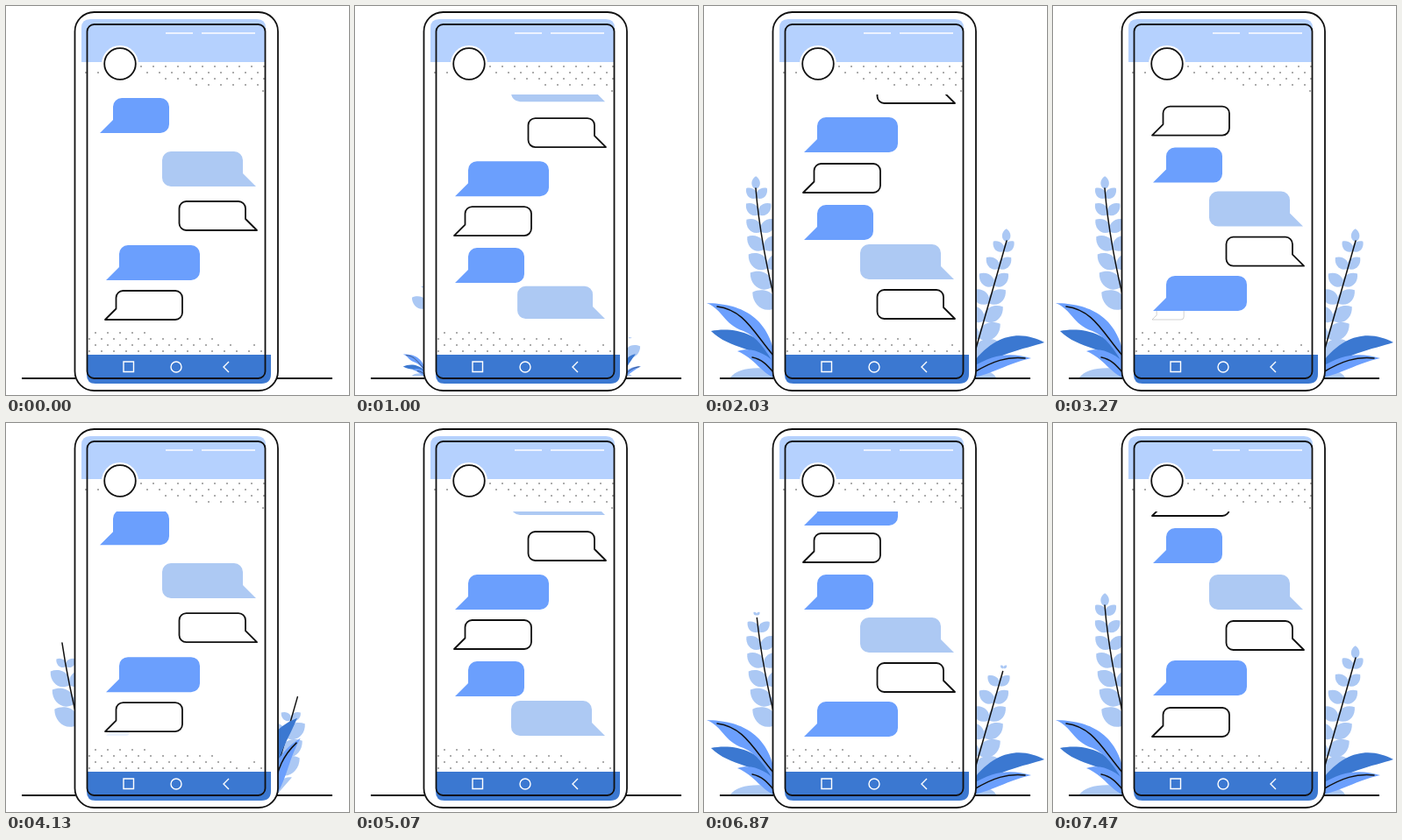
An HTML page for the animation above (7530 ms loop, 391 px wide and 444 px high).

```html
<!DOCTYPE html>
<html lang="en">
<head>
<meta charset="utf-8">
<title>Chat on a phone</title>
<style>
html, body { margin: 0; width: 100%; height: 100%; overflow: hidden; background: #fff; }
svg { display: block; width: 391px; height: 444px; }
.line { fill: none; stroke: #111; stroke-width: 1.8; stroke-linejoin: round; }
.rib { fill: none; stroke: #111; stroke-width: 1.5; stroke-linecap: round; }
.dots { fill: none; stroke: #333; stroke-width: 1.5; stroke-linecap: round; stroke-dasharray: 0 14; }
.icon { fill: none; stroke: #fff; stroke-width: 1.4; }
.light { fill: #abc8f4; }
.mid { fill: #6b9ffd; }
.dark { fill: #3b78d1; }
</style>
</head>
<body>
<svg viewBox="0 0 391 444">
  <clipPath id="view"><rect x="80" y="101" width="228" height="297"/></clipPath>
  <g id="plants">
    <g id="stems"></g>
    <g data-side="left" data-turn="0"><path class="light" d="M30 424C38 414 55 411 82 415V424Z"/></g>
    <g data-side="left" data-turn="-13"><path class="dark" d="M8 371C30 367 60 370 82 402V414C62 388 30 393 8 371Z"/></g>
    <g data-side="left" data-turn="-3">
      <path class="mid" d="M82 405C74 352 40 340 3 339C22 347 22 363 45 371C60 377 70 392 82 412Z"/>
      <path class="rib" d="M15 343C46 347 56 372 80 400"/>
    </g>
    <g data-side="left" data-turn="-8">
      <path class="mid" d="M38 394C55 388 72 398 82 408V425C66 420 58 402 38 394Z"/>
      <path class="rib" d="M55 401C66 403 72 410 80 419"/>
    </g>
    <g data-side="right" data-turn="0"><path class="light" d="M333 424C328 416 318 415 306 416V424Z"/></g>
    <g data-side="right" data-turn="-40"><path class="dark" d="M388 384C365 372 335 370 306 408V422C330 396 365 392 388 384Z"/></g>
    <g data-side="right" data-turn="-14">
      <path class="mid" d="M373 402C350 395 330 397 306 412V424C330 420 345 408 373 402Z"/>
      <path class="rib" d="M366 402C345 400 330 405 308 418"/>
    </g>
  </g>
  <path class="line" d="M18 425H79M309 425H372"/>
  <rect x="78.5" y="7" width="231.500" height="432" rx="22" fill="#fff"/>
  <path fill="#b5d1fe" d="M86 64V25Q86 15 96 15H286Q296 15 296 25V64Z"/>
  <path class="dark" d="M92 398H302V420Q302 431 291 431H102Q92 431 92 421Z"/>
  <path class="dots" d="M154 69H295M91 76H106M147 76H289M182 83H295M217 90H289M293 97H294"/>
  <path class="dots" d="M102 373H160M95 380H236M102 387H257M283 387H284M95 394H299"/>
  <g id="chat" clip-path="url(#view)"></g>
  <rect class="line" x="92.500" y="21" width="203" height="404" rx="8"/>
  <rect class="line" x="78.500" y="7" width="231.500" height="432" rx="22"/>
  <path class="icon" d="M182 31H213M223 31H284"/>
  <circle cx="130" cy="66" r="21" fill="#fff"/>
  <circle class="line" cx="130" cy="66" r="17.800"/>
  <path class="icon" d="M134 406H145.500V417.500H134ZM254 406L248 412L254 418"/>
  <circle class="icon" cx="194" cy="412" r="6"/>
</svg>
<script>
const LOOP = 7530;
const clamp = v => Math.max(0, Math.min(1, v));
const lerp = (a, b, p) => a + (b - a) * p;
const ease = p => (1 - Math.cos(Math.PI * clamp(p))) / 2;
const $ = id => document.getElementById(id);

function add(parent, attrs) {
  const node = document.createElementNS('http://www.w3.org/2000/svg', 'path');
  set(node, attrs);
  return parent.appendChild(node);
}
function set(node, attrs) {
  for (const key in attrs) node.setAttribute(key, attrs[key]);
}

// Bubble outline with its top at y = 0; side is -1 for a left tail, 1 for a right tail.
function bubble(left, right, height, tail, radius, side, paint) {
  const near = side < 0 ? left : right, far = side < 0 ? right : left;
  const r = radius * side, tip = near + tail * side, sweep = side < 0 ? 1 : 0;
  const arc = (x, y) => `A${radius} ${radius} 0 0 ${sweep} ${x} ${y}`;
  const d = `M${tip} ${height}L${near} ${height - tail}V${radius}${arc(near - r, 0)}H${far + r}` +
    `${arc(far, radius)}V${height - radius}${arc(far + r, height)}Z`;
  return { d, tip, height, ...paint };
}
const fill = color => ({ fill: color, stroke: 'none', inset: 0 });
const outline = { fill: '#fff', stroke: '#111', inset: 1 };
const KINDS = [
  bubble(129, 193, 40, 15, 10, -1, fill('#6b9ffd')),
  bubble(178, 270, 40, 15, 10, 1, fill('#adc9f3')),
  bubble(197.5, 273, 33, 13, 8, 1, outline),
  bubble(129, 221, 40, 15, 10, -1, fill('#6b9ffd')),
  bubble(125.500, 201, 33, 12.500, 8, -1, outline)
];

// Bubble tops, newest first; `moved` is the row that sits 7px further left.
const small = { newest: 0, tops: [317, 270, 220, 169, 112, 52], moved: 5 };
const pale = { newest: 1, tops: [317, 272, 224, 173, 123, 65] };
const reply = { newest: 2, tops: [323, 272, 227, 179, 127, 77] };
const wide = { newest: 3, tops: [318, 273, 222, 173, 125, 77] };
const answer = { newest: 4, tops: [324, 271, 225, 173, 120, 72] };
const spread = { newest: 4, tops: [324, 273, 222, 166, 105, 50], moved: 4 };
const EVENTS = [
  [-1000, 200, spread], [50, 210, small], [783, 270, pale], [1620, 210, reply],
  [2445, 215, wide], [3205, 215, answer], [3560, 480, spread], [4090, 190, small],
  [4795, 270, pale], [5645, 215, reply], [6475, 215, wide], [7250, 215, answer]
];
const rows = small.tops.map(() => add($('chat'), { 'stroke-width': 1.8, 'stroke-linejoin': 'round' }));

function drawChat(t) {
  const index = EVENTS.findLastIndex(e => e[0] <= t);
  const [start, length, now] = EVENTS[index];
  const before = EVENTS[Math.max(0, index - 1)][2];
  const p = ease((t - start) / length);
  const step = before.newest === now.newest ? 0 : 1;
  const slide = (state, i) => state.moved === i ? -7 : 0;
  rows.forEach((row, i) => {
    const kind = KINDS[(now.newest - i + 10) % 5];
    const pops = step && i === 0;
    const from = pops ? 0 : i - step;
    const y = (pops ? now.tops[0] : lerp(before.tops[from], now.tops[i], p)) + kind.inset;
    const x = pops ? 0 : lerp(slide(before, from), slide(now, i), p);
    const size = pops ? lerp(0.25, 1, p) : 1;
    set(row, {
      d: kind.d, fill: kind.fill, stroke: kind.stroke,
      opacity: pops ? clamp(p * 1.2) : 1,
      transform: `translate(${x + kind.tip * (1 - size)} ${y + kind.height * (1 - size)}) scale(${size})`
    });
  });
}

const LEAF = 'M0 0C.45 -.2 .4 -.75 0 -1C-.4 -.75 -.45 -.2 0 0Z';
function makeStem(base, bend, top) {
  const at = u => [0, 1].map(k => lerp(lerp(base[k], bend[k], u), lerp(bend[k], top[k], u), u));
  const leaves = [];
  const leaf = (u, angle, length) =>
    leaves.push({ u, angle, length, node: add($('stems'), { class: 'light', d: LEAF }) });
  for (let i = 0; i < 7; i++) {
    for (const side of [-1, 1]) leaf(0.04 + 0.145 * i, side * (58 - 2 * i), 32 - 2.6 * i);
  }
  leaf(0.99, 0, 15);
  return { base, bend, at, leaves, line: add($('stems'), { class: 'rib' }) };
}
const stems = [
  makeStem([84, 350], [64, 270], [59, 208]),
  makeStem([306, 405], [326, 335], [345, 268])
];
const blades = [...document.querySelectorAll('[data-side]')];

function drawStem(stem, grown, lead) {
  const [x, y] = stem.at(grown);
  const bend = [0, 1].map(k => lerp(stem.base[k], stem.bend[k], grown));
  set(stem.line, { d: `M${stem.base}Q${bend} ${x} ${y}` });
  for (const { u, angle, length, node } of stem.leaves) {
    const size = length * (grown === 1 ? 1 : clamp((grown + lead - u) / 0.25));
    set(node, { transform: `translate(${stem.at(u)}) rotate(${angle}) scale(${size})` });
  }
}

function drawPlants(t) {
  const growing = t >= 6110 ? t - 6110 : t - 930;
  const fold = t >= 6110 ? 0 : clamp((t - 3570) / 700);
  const shown = growing > 0 && fold < 1;
  $('plants').style.display = shown ? '' : 'none';
  if (!shown) return;

  const grown = Math.sin(clamp(growing / 1100) * Math.PI / 2) * (1 - fold ** 5);
  stems.forEach(stem => drawStem(stem, grown, fold ? -0.05 : 0.1));

  const size = 1 - (1 - clamp(growing / 420)) ** 2;
  const settle = 1 - ease(growing / 740);
  for (const blade of blades) {
    const left = blade.dataset.side === 'left';
    const turn = blade.dataset.turn * settle + (left ? 120 * fold ** 1.5 : -95 * fold ** 3);
    const scale = size * (left ? 1 - fold ** 2 : 1);
    const x = left ? 80 : 308;
    set(blade, { transform: `translate(${x} 422) rotate(${turn}) scale(${scale}) translate(${-x} -422)` });
  }
}

const begin = performance.now();
function frame() {
  const t = (performance.now() - begin) % LOOP;
  drawChat(t);
  drawPlants(t);
  requestAnimationFrame(frame);
}
frame();
</script>
</body>
</html>
```
